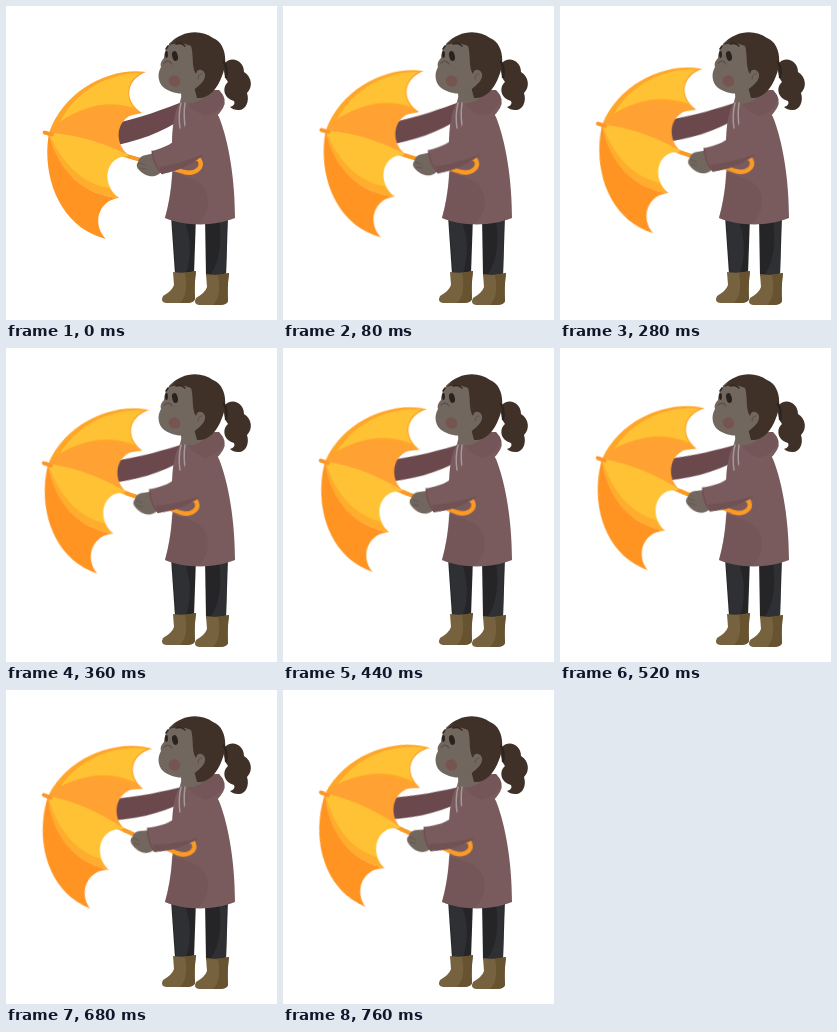
These frames come from a looping animation (271x314 px, 1.56 s). An HTML page without scripts:

```html
<!DOCTYPE html>
<html lang="en">
<head>
<meta charset="utf-8">
<title>Girl raising an umbrella</title>
<style>
  html, body { margin: 0; width: 100%; height: 100%; overflow: hidden; background: #fff; }
  svg { display: block; width: 100vw; height: 100vh; }
  .lift { animation: lift 1560ms infinite; transform-origin: 197px 110px; }
  .far { transform-origin: 172px 105px; }
  @keyframes lift {
    0% { transform: rotate(0deg); animation-timing-function: steps(19, end); }
    48.7%, 100% { transform: rotate(8.7deg); }
  }
  .coat { fill: #7a5b5d; }
  .shade { fill: #6d4f52; }
  .skin { fill: #72675f; }
  .hair { fill: #3f3127; }
  .boot { fill: #77623f; }
  .sole { fill: #67532f; }
  .line { fill: none; stroke-linecap: round; stroke-linejoin: round; }
</style>
</head>
<body>
<svg viewBox="0 0 271 314">
  <!-- far arm -->
  <path class="lift far" fill="#6b484c" d="M176 96C160 102 136 112 102 119L100 141C132 136 156 126 178 112Z"/>

  <!-- canopy -->
  <g class="lift">
    <path class="line" stroke="#f99a25" stroke-width="3.4" d="M38.500 126.500L133 153.500"/>
    <path fill="#ffa62a" d="M140 66C104 61 58 84 43 127L136 107C117 95 120 74 140 66Z"/>
    <path fill="#ffc234" d="M134 67C104 67 70 84 54 116C78 99 104 94 128 102C119 91 120 76 134 67Z"/>
    <path fill="#ffa133" d="M43 127C66 99 106 96 136 107C108 107 105 142 128 152C100 139 74 130 43 127Z"/>
    <path fill="#ffc234" d="M43 127C74 129 102 138 128 152C103 143 91 175 113 192C78 187 52 164 43 127Z"/>
    <path fill="#ffad2c" d="M43 127C56 158 77 178 103 182Q107 188 113 192C78 189 51 166 43 127Z"/>
    <path fill="#ff9422" d="M43 127C35 172 55 222 100 233C85 218 93 194 113 192C79 189 52 167 43 127Z"/>
    <path class="line" stroke="#fb9628" stroke-width="3.600" d="M38.500 126.500L46 128.600"/>
  </g>

  <!-- legs and boots -->
  <path fill="#252528" d="M165 210H190L188 268H169Z"/>
  <path fill="#2f3033" d="M166 214H178C186 232 185 252 180 267H170Z"/>
  <path fill="#252528" d="M199 210H222L220 270H200Z"/>
  <path fill="#2f3033" d="M213 214H221L220 268H205C214 255 216 236 213 214Z"/>
  <g id="boot">
    <path class="boot" d="M167 266Q178 268 190 265Q188 280 189 293Q188 297 180 297H160Q154 296 157 290Q166 285 168 279Z"/>
    <path class="sole" d="M190 265Q188 280 189 293Q188 297 180 297H174Q183 288 179 267Z"/>
  </g>
  <use href="#boot" x="33" y="2"/>

  <!-- coat -->
  <path class="coat" d="M174 96C188 90 207 98 213 111C223 136 229 174 229 212C207 221 178 220 159 212C166 188 168 159 166 139C166 122 168 106 174 96Z"/>
  <path class="shade" d="M166 166C181 172 193 171 200 186C205 200 199 211 192 218Q173 218 159 212Q165 190 166 166Z" opacity=".4"/>
  <path class="coat" d="M178 96Q192 83 213 84Q222 93 217 102Q211 112 203 115Q187 105 178 96Z"/>
  <path class="shade" d="M180 95Q196 96 205 84L213 84Q218 89 218 95Q211 108 199 110Q186 105 180 95Z" opacity=".4"/>

  <!-- head -->
  <path class="skin" d="M174 78L193 70L201 89Q188 101 174 96Q176 91 175 87Z"/>
  <path class="hair" d="M218 58C225 49 238 54 238 66C246 71 247 81 241 87C244 96 239 105 232 104Q227 104 224 101Q230 99 228 95C217 92 216 81 222 76Q217 70 218 58Z"/>
  <path class="hair" d="M163 38C176 24 195 23 207 32C220 37 222 56 216 70C211 84 202 93 191 92L180 50Z"/>
  <path class="skin" d="M164 37C160 42 158 47 158 52C155 55 154 58 155 61C151 68 152 76 157 81C166 88 180 91 190 82C194 79 200 74 199 68C197 62 191 63 189 67C188 57 186 47 187 38C180 33 170 33 164 37Z"/>
  <path class="hair" d="M163 39C175 29 187 30 195 37C190 44 195 59 190 68C185 60 188 48 185 40Q175 35 163 39Z"/>
  <path class="line" stroke="#5c5049" d="M192 73Q192 68 196 68"/>
  <ellipse cx="168.500" cy="75" rx="6" ry="5.500" fill="#76544f" transform="rotate(35 168.500 75)"/>
  <ellipse cx="169" cy="50" rx="2.800" ry="5" fill="#29221e" transform="rotate(-14 169 50)"/>
  <ellipse cx="160.500" cy="48.500" rx="1.400" ry="3.400" fill="#29221e"/>
  <path class="line" stroke="#342820" stroke-width="1.600" d="M170 38Q175 36 179 40M160 43L162 40"/>
  <path class="line" stroke="#5c5049" stroke-width="1.300" d="M158 57Q163 53 166 58"/>
  <path class="line" stroke="#2e241f" stroke-width="2.500" d="M218 56Q222 63 220 71"/>

  <!-- cords -->
  <path class="line" stroke="#a39b98" stroke-width="1.500" d="M175 97Q172 109 174 122M179 97Q177 110 180 126"/>

  <!-- near arm and handle -->
  <g class="lift">
    <path class="line" stroke="#fb9a24" stroke-width="4.400" d="M150 158L178 166C190 169 197 161 194 155Q192 151 188 153"/>
    <path class="line" stroke="#f99a25" stroke-width="3.400" d="M123 150.500L140 155.500"/>
    <path class="skin" d="M149 147C157 148 160 164 153 168C146 173 138 169 133 164Q129 160 132 156Q133 150 140 149Z"/>
    <path class="line" stroke="#62574f" d="M133 157L139 159M134 162L140 163"/>
    <path class="coat" d="M146 145C158 142 169 137 176 127C180 113 190 108 199 112C211 119 208 137 198 148C185 160 171 165 156 168C149 163 144 152 146 145Z"/>
    <path class="shade" d="M156 168C170 165 185 160 198 148C190 151 173 158 153 161Z" opacity=".7"/>
    <path class="line" stroke="#684b4e" d="M146 145Q148 160 156 168"/>
  </g>
</svg>
</body>
</html>
```
